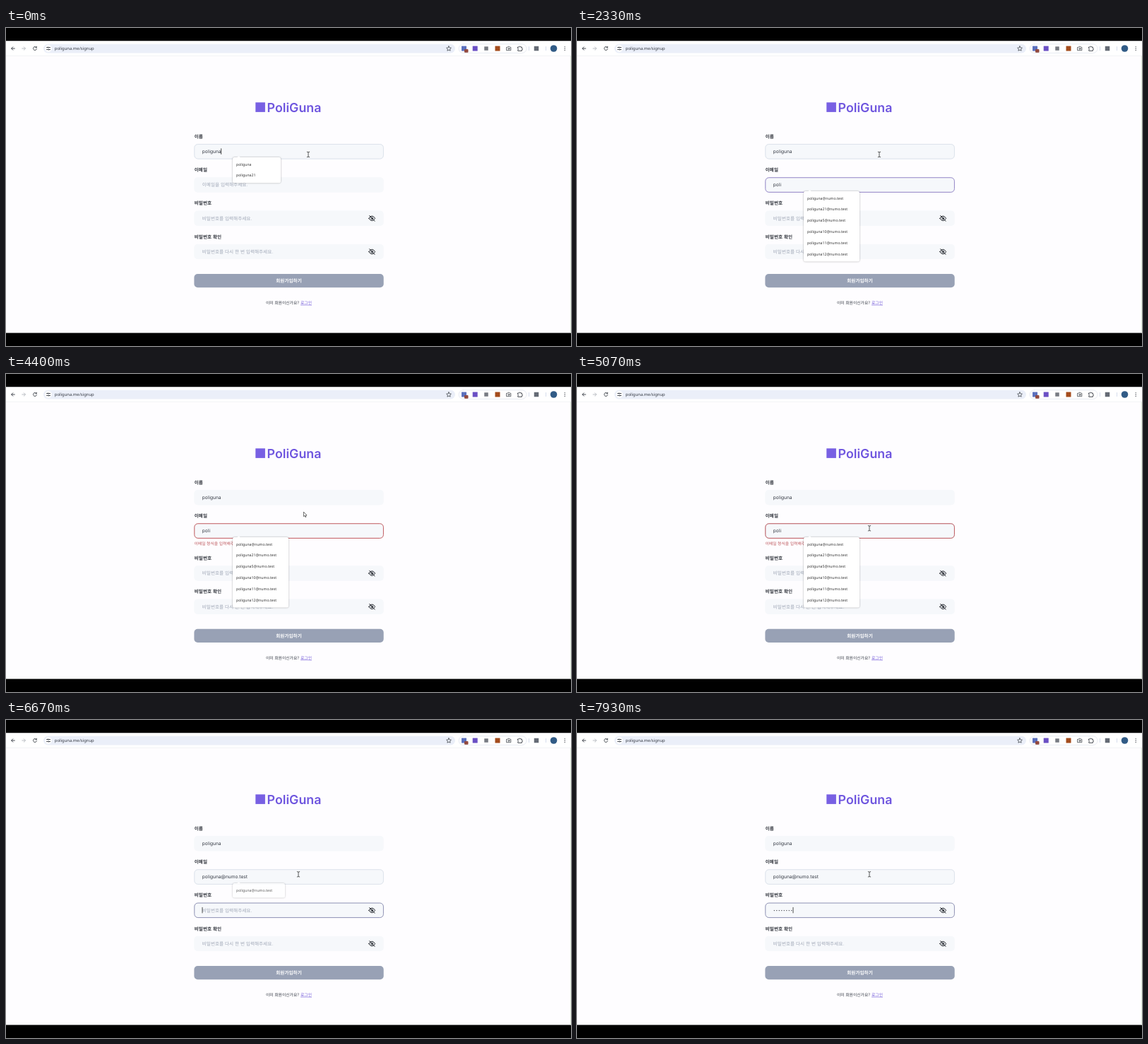
These frames come from a looping animation (800 px wide and 450 px high, 8000 ms). An HTML page:

```html
<!DOCTYPE html>
<html lang="ko">
<head>
<meta charset="utf-8">
<title>Sign up</title>
<style>
  html, body { margin: 0; width: 100%; height: 100%; overflow: hidden; background: #000; }
  svg { display: block; width: 100vw; height: 100vh; }
  text { font: 6.6px Inter, "Noto Sans CJK KR", "Noto Sans CJK", sans-serif; fill: #343943;
         text-rendering: geometricPrecision; white-space: pre; }
  .ko { font-family: "Noto Sans CJK KR", "Noto Sans CJK", sans-serif; }
  .label { font-weight: 600; fill: #30343c; }
  .hint { fill: #a0a8b7; }
  .small { font-size: 5.8px; }
  .menu text { font: 5.2px "Noto Sans", "Open Sans", sans-serif; fill: #333; }
  .menu rect { fill: #fff; filter: drop-shadow(0 .6px 1.2px #0005); }
  .icon { fill: none; stroke: #444950; stroke-width: 1; stroke-linecap: round; stroke-linejoin: round; }
  .border { fill: none; stroke-width: 1; }
</style>
</head>
<body>
<svg id="stage" viewBox="0 0 800 450"></svg>
<script>
const LOOP = 8000;
const USER = 'poliguna', HOST = '@numo.test';
const ROW = 47.25, SHIFT = 12.7;
const COLORS = { hover: '#dce2eb', focus: '#9284c6', dark: '#8f91b4', error: '#c1595e' };

const $ = id => document.getElementById(id);
const ramp = (t, start, length) => Math.min(1, Math.max(0, (t - start) / length));
const show = (id, amount) => $(id).setAttribute('opacity', +amount);

const border = (id, y, color) =>
  `<rect id="${id}" class="border" x="266.8" y="${y}" width="267.6" height="20.6" rx="5" stroke="${color}"/>`;

const eye = y => `<g class="icon" stroke-width=".9" style="stroke:#22262d" transform="translate(518.2 ${y})">
  <path d="M-4.4 0Q-2.4-3.3 0-3.3T4.4 0Q2.4 3.3 0 3.3T-4.4 0Z"/>
  <circle r="1.4"/><path d="M-3.6-3.9L3.8 3.9"/></g>`;

const field = (index, label, hint, id) => {
  const y = 164.5 + index * ROW;
  return `<text class="ko label" x="266.8" y="${y - 8.7}">${label}</text>
    <rect x="266.3" y="${y - .4}" width="268.5" height="21.4" rx="5" fill="#f6f8fb"/>
    <text class="hint" id="${id}Hint" x="277.8" y="${y + 12.7}">${hint}</text>
    <text id="${id}" x="277.8" y="${y + 12.6}"></text>`;
};

const square = (x, color, size = 7) =>
  `<rect x="${x - size / 2}" y="${29 - size / 2}" width="${size}" height="${size}" fill="${color}"/>`;

const browserBar = `
  <rect y="18.5" width="800" height="21" fill="#fff"/>
  <path d="M0 39.3H800" stroke="#e8e9ee" stroke-width=".6"/>
  <rect x="53" y="22.8" width="583" height="12.6" rx="6.3" fill="#ebeff9"/>
  <text x="68.8" y="31.1" style="font:5.9px 'Noto Sans',sans-serif">${USER}.me/signup</text>
  <g class="icon">
    <path d="M12.3 29H7.8M9.8 26.8L7.6 29l2.2 2.2"/>
    <path stroke="#b9bcc2" style="stroke:#b9bcc2" d="M22.8 29h4.5M25.3 26.8l2.2 2.2-2.2 2.2"/>
    <path d="M43 27.4A2.5 2.5 0 1 0 43.4 29.8M43.3 26.3v1.5h-1.5"/>
    <circle cx="60" cy="29" r="4.8" fill="#fff" stroke="none" style="stroke:none"/>
    <path d="M57.6 27.5h1M60.7 27.5h1.8M57.6 30.5h1.8M61.5 30.5h1"/>
    <circle cx="59.6" cy="27.5" r=".6"/><circle cx="60.6" cy="30.5" r=".6"/>
    <path stroke-width=".8" d="M627 25.7l1 2.2 2.4.3-1.8 1.6.5 2.4-2.1-1.2-2.1 1.2.5-2.4-1.8-1.6 2.4-.3Z"/>
    <rect x="641" y="22.8" width="96" height="12.6" rx="6.3" style="stroke:#dfe3ee;stroke-width:.7"/>
    <path d="M709 27.3h1.2l.8-1.1h1.8l.8 1.1h1.2v4.4H709Z" style="stroke-width:.8"/>
    <circle cx="711.9" cy="29.3" r="1.1" style="stroke-width:.8"/>
    <path d="M724.8 27h1.8a1 1 0 0 1 2 0h1.8v1.8a1 1 0 0 1 0 2v1.5h-5.6v-1.6a1 1 0 0 0 0-1.9Z"/>
    <path style="stroke:#d5dcec" d="M740.5 26.5v5M764.5 26.5v5"/>
  </g>
  ${square(648.5, '#5b70bd')}<rect x="649" y="30" width="5.5" height="4.8" rx="1" fill="#92493f"/>
  ${square(664.2, '#6a4fc4')}${square(680, '#777b82', 5.5)}${square(696, '#a34c1d')}${square(751, '#656b75', 6.5)}
  <circle cx="775.5" cy="29" r="4.8" fill="#315b86"/>
  <g fill="#444950"><circle cx="791.2" cy="26.6" r=".7"/><circle cx="791.2" cy="29" r=".7"/><circle cx="791.2" cy="31.4" r=".7"/></g>`;

$('stage').innerHTML = `
  <rect width="800" height="450"/>
  <rect y="18.5" width="800" height="413" fill="#fefdff"/>
  <path d="M799.5 39V431.5" stroke="#e3efdf"/>
  ${browserBar}
  <rect x="353.3" y="105.3" width="13.6" height="13.6" fill="#7860e3"/>
  <text x="369.6" y="118.7" style="font:600 17.8px Inter,sans-serif;fill:#6f56df">PoliGuna</text>
  ${field(0, '이름', '', 'name')}
  ${border('nameHover', 164.5, COLORS.hover)}
  ${field(1, '이메일', '이메일을 입력해주세요.', 'email')}
  ${border('emailHover', 164.5 + ROW, COLORS.hover)}
  ${border('emailFocus', 164.5 + ROW, COLORS.focus)}
  ${border('emailError', 164.5 + ROW, COLORS.error)}
  <text id="message" class="ko small" x="266.5" y="242.1" style="fill:#bd5358">이메일 형식을 입력해주세요.</text>
  <g id="lower">
    ${field(2, '비밀번호', '비밀번호를 입력해주세요.', 'password')}
    ${border('passwordFocus', 164.5 + 2 * ROW, COLORS.dark)}
    ${eye(269.4)}
    <path id="dots" stroke="#2d3038" stroke-width="1.4" stroke-linecap="round" stroke-dasharray="0 3.5"/>
    ${field(3, '비밀번호 확인', '비밀번호를 다시 한 번 입력해주세요.', 'confirm')}
    ${eye(316.6)}
    <rect x="266.4" y="348" width="268.3" height="19.2" rx="5" fill="#98a1b5"/>
    <text class="ko" x="400.5" y="360" text-anchor="middle" style="fill:#fff;font-weight:600">회원가입하기</text>
    <text class="ko small" x="368" y="391.1" style="font-weight:500">이미 회원이신가요?</text>
    <text class="ko small" x="417" y="391.1" style="fill:#7158d8">로그인</text>
    <path d="M417 392.1h16" stroke="#7158d8" stroke-width=".6"/>
  </g>
  <rect id="caret" width=".8" height="8.4" fill="#222"/>
  <g id="menu" class="menu"></g>
  <g id="beam" class="icon" style="stroke:#333;stroke-width:.8">
    <path d="M-1.7-3.7Q0-3.7 0-2.9Q0-3.7 1.7-3.7M0-3V3M-1.7 3.7Q0 3.7 0 2.9Q0 3.7 1.7 3.7"/></g>
  <path id="arrow" d="M0 0V6.6L1.5 5.3 2.5 7.5 3.5 7 2.5 4.9H4.6Z" fill="#fff" stroke="#333" stroke-width=".7"/>`;

// Time of each change and the value from then on.
const typed = [
  [0, ''], [1730, 1], [2070, 2], [2130, 3], [2200, 4], [5270, 5], [5400, 6], [5530, 7], [5670, 8],
  [5870, 10], [5930, 11], [6000, 12], [6070, 13], [6130, 14], [6270, 15], [6330, 16], [6400, 17], [6470, 18]
];
const mouse = [[0, 428, 179], [3869, 428, 179], [3870, 428, 182], [4200, 428, 182], [4400, 421.5, 195], [4600, 414, 218.3], [LOOP, 414, 218.3]];

const emails = ['', 21, 5, 10, 11, 12].map(n => USER + n + HOST);
const menus = {
  name: [183, 68, [USER, USER + 21]],
  many: [231, 79, emails],
  two: [231, 74, [emails[0], USER + '@mu.test']],
  one: [231, 74, [emails[0]]]
};
let openMenu;

function drawMenu(kind) {
  if (kind === openMenu) return;
  openMenu = kind;
  const [top, width, items] = menus[kind];
  $('menu').innerHTML = `<rect x="321" y="${top}" width="${width}" height="${items.length * 15.8 + 4.6}" rx="2.5"/>
    <path d="M327 ${top + .3}l2.5-2 2.5 2Z" fill="#fff"/>` +
    items.map((item, i) => `<text x="326" y="${top + 11.6 + i * 15.8}">${item}</text>`).join('');
}

function placeCaret(t, dots, shift) {
  const row = t < 1270 ? 0 : t < 6600 ? 1 : 2;
  const width = row === 2 ? dots * 3.5 : $(row ? 'email' : 'name').getComputedTextLength();
  const hidden = row === 0 ? (t >= 70 && t < 600) || t >= 1130 : t >= 2200 && t < 5200;
  $('caret').setAttribute('x', 277.6 + width);
  $('caret').setAttribute('y', 170.4 + row * ROW + (row === 2 ? shift : 0));
  show('caret', !hidden);
}

function placeMouse(t) {
  const next = mouse.findIndex(key => key[0] > t);
  const [a, b] = [mouse[next - 1], mouse[next]];
  const k = (t - a[0]) / (b[0] - a[0]);
  const x = a[1] + (b[1] - a[1]) * k, y = a[2] + (b[2] - a[2]) * k;
  const between = y > 185.5 && y < 211.5;
  for (const id of ['beam', 'arrow']) $(id).setAttribute('transform', `translate(${x} ${y})`);
  show('beam', !between);
  show('arrow', between);
}

function render(t) {
  const count = typed.filter(([start]) => start <= t).pop()[1];
  const dots = t < 7000 ? 0 : Math.min(8, 1 + Math.floor((t - 7000) / 120));
  const invalid = t >= 3070 && t < 6600;
  const shift = invalid ? SHIFT : 0;

  $('name').textContent = USER;
  $('email').textContent = (USER + HOST).slice(0, count || 0);
  show('emailHint', !count);
  show('passwordHint', !dots);
  $('dots').setAttribute('d', dots ? `M279.3 269.6h${(dots - 1) * 3.5 + .1}` : '');
  $('lower').setAttribute('transform', `translate(0 ${shift})`);
  show('message', invalid);

  show('nameHover', 1 - ramp(t, 4230, 150));
  show('emailHover', ramp(t, 4500, 150));
  show('emailFocus', ramp(t, 1270, 200) * (1 - ramp(t, 3070, 200)));
  show('emailError', ramp(t, 3070, 200) * (1 - ramp(t, 6530, 130)));
  show('passwordFocus', ramp(t, 6600, 70));

  drawMenu(t < 2000 ? 'name' : t < 5870 ? 'many' : t < 5930 ? 'two' : 'one');
  show('menu', t < 2000 ? 1 - ramp(t, 1270, 130) : ramp(t, 2180, 130) * (1 - ramp(t, 6640, 150)));

  placeCaret(t, dots, shift);
  placeMouse(t);
}

function tick() {
  render(performance.now() % LOOP);
  requestAnimationFrame(tick);
}
tick();
</script>
</body>
</html>
```
